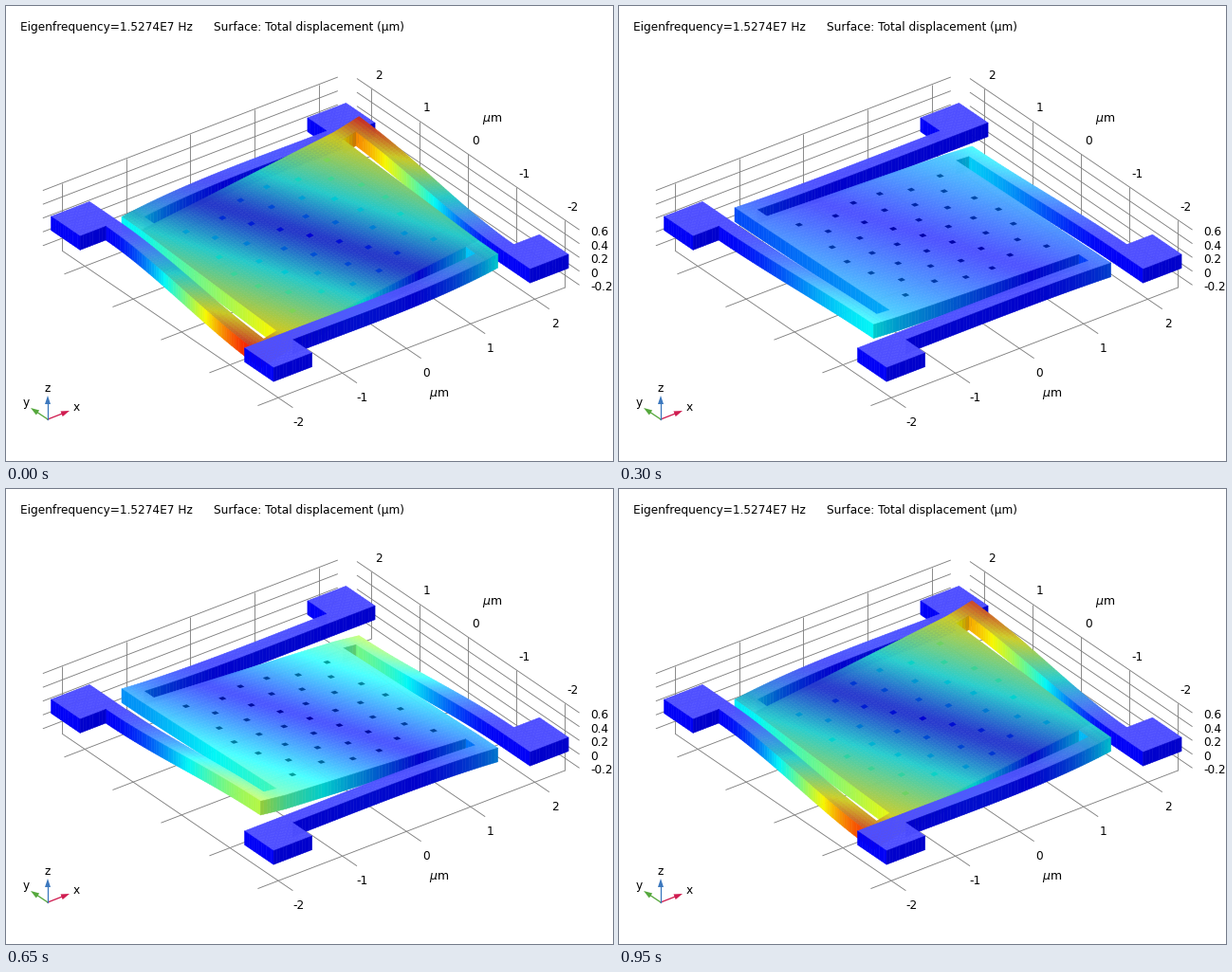
Write a matplotlib script that moves like this. It is 640 px wide and 480 px high and loops after 1 s.

```python
import numpy as np
import matplotlib.pyplot as plt
from matplotlib.animation import FuncAnimation
from matplotlib.collections import LineCollection, PolyCollection

FRAMES, INTERVAL = 20, 50
PX = 0.72                      # points per pixel at 100 dpi
TILT_X, TILT_Y = 0.115, 0.045  # slope of the plate at full swing
TILT = np.hypot(TILT_X, TILT_Y)
LINK_FLEX = 0.375              # extra swing along the plate-to-beam links
THICK, TOP_Z = 0.2, 0.305
X_MAX = 2.3                    # half size of the device
WALL = 2.47                    # position of the grid walls
Z_FLOOR, Z_CEIL = -0.38, 0.6

plt.rcParams["font.family"] = "DejaVu Sans"
plt.rcParams["mathtext.fontset"] = "dejavusans"
fig = plt.figure(figsize=(6.4, 4.8), dpi=100, facecolor="white")
ax = fig.add_axes([0, 0, 1, 1])
ax.set(xlim=(0, 640), ylim=(480, 0))
ax.axis("off")


def project(x, y, z):
    """Parallel projection to pixels; z is measured from the resting top."""
    return np.stack([320.3 + 67.6 * x - 51 * y,
                     242 - 26 * x - 34.7 * y - 72.8 * z], axis=-1)


def quarter_turns(x, y):
    """Yield the point and the plate slope in the frame of each arm."""
    p, q = TILT_X, TILT_Y
    for _ in range(4):
        yield x, y, p, q
        x, y, p, q = -y, x, -q, p


def solid(x, y):
    far_x, far_y = np.abs(x), np.abs(y)
    inside = ((far_x < 1.5) & (far_y < 1.5)) | ((far_x > 1.7) & (far_y > 1.7))
    for u, v, _, _ in quarter_turns(x, y):
        beam = (u > -1.9) & (u < -1.7) & (v > -1.5) & (v < 1.75)
        link = (u > -1.9) & (u < -1.45) & (v > -1.5) & (v < -1.3)
        inside |= beam | link
    return inside


def mode_shape(x, y):
    """Rigid plate, flexible links, clamped anchors, cubic beams in between."""
    w = TILT_X * x + TILT_Y * y
    for u, v, p, q in quarter_turns(x, y):
        flex = 1 + LINK_FLEX * np.maximum(-1.5 - u, 0)
        t = np.clip((1.7 - v) / 3, 0, 1)
        end, slope = (p * u - 1.3 * q) * flex, -3 * q
        bend = end * (3 * t**2 - 2 * t**3) + slope * (t**3 - t**2)
        link = (u < -1.51) & (v > -1.51) & (v < -1.29)
        beam = (u < -1.69) & (v > -1.29) & (v < 1.71)
        w = np.where(link, (p * u + q * v) * flex, np.where(beam, bend, w))
    anchor = (np.abs(x) > 1.69) & (np.abs(y) > 1.69)
    return np.where(anchor, 0, w)


def rainbow(v):
    knots = [0, 0.31, 0.69, 1]
    return np.stack([np.interp(v, knots, c) for c in
                     ([0, 0, 1, 1], [0, 1, 1, 0], [1, 1, 0, 0])], axis=-1)


def build_faces(n=92):
    """Visible faces of the grid cells, sorted from back to front."""
    axis = np.linspace(-X_MAX, X_MAX, n + 1)
    mid = (axis[1:] + axis[:-1]) / 2
    filled = solid(*np.meshgrid(mid, mid, indexing="ij"))
    padded = np.pad(filled, 1)
    sides = [
        (filled, [0, 1, 1, 0], [0, 0, 1, 1], [0, 0, 0, 0]),
        (filled & ~padded[:-2, 1:-1], [0] * 4, [0, 1, 1, 0], [0, 0, 1, 1]),
        (filled & ~padded[1:-1, :-2], [0, 1, 1, 0], [0] * 4, [0, 0, 1, 1]),
    ]
    ix, iy, drop, kind, depth = [], [], [], [], []
    for k, (mask, dx, dy, dz) in enumerate(sides):
        i, j = np.nonzero(mask)
        ix.append(i[:, None] + dx)
        iy.append(j[:, None] + dy)
        drop.append(np.tile(dz, (len(i), 1)) * THICK)
        kind.append(np.full(len(i), k))
        depth.append(i + j)
    order = np.argsort(-np.concatenate(depth), kind="stable")
    ix, iy, drop, kind = (np.concatenate(a)[order] for a in (ix, iy, drop, kind))
    return axis[ix], axis[iy], drop, kind


fx, fy, drop, kind = build_faces()
shape = mode_shape(fx, fy)
top = kind == 0

# Slope of each top face along the plate's own tilt: 1 on the plate, 0 on anchors.
cell = fx[top][:, 1] - fx[top][:, 0]
grad_x = (shape[top][:, 1] - shape[top][:, 0]) / cell
grad_y = (shape[top][:, 3] - shape[top][:, 0]) / cell
lean = np.clip((grad_x * TILT_X + grad_y * TILT_Y) / TILT**2, -1, 1)

# Total displacement; a leaning top also slides sideways a little.
size = np.abs(shape.mean(axis=1))
size[top] = np.hypot(size[top], THICK / 2 * TILT * lean)
peak = np.abs(shape).max()

# Etch holes: a centre, three rings and one in each corner.
centres = [(0, 0)] + [(sx * 1.1, sy * 1.1) for sx in (-1, 1) for sy in (-1, 1)]
for radius, count in ((0.4, 6), (0.79, 12), (1.18, 18)):
    for angle in 2 * np.pi * np.arange(count) / count:
        centres.append((radius * np.cos(angle), radius * np.sin(angle)))
centres = np.array(centres)
rim = (np.arange(4) + 0.5) * np.pi / 2
hole_x = centres[:, :1] + 0.05 * np.cos(rim)
hole_y = centres[:, 1:] + 0.05 * np.sin(rim)
hole_w = TILT_X * hole_x + TILT_Y * hole_y


def draw_grid():
    def line(a, b):
        return [project(x, y, z - TOP_Z) for x, y, z in (a, b)]

    segments = []
    for t in range(-2, 3):
        segments += [
            line((t, WALL, Z_FLOOR), (t, WALL, Z_CEIL)),
            line((WALL, t, Z_FLOOR), (WALL, t, Z_CEIL)),
            line((t, WALL, Z_FLOOR), (t, -X_MAX, Z_FLOOR)),
            line((-2.32, t, Z_FLOOR), (WALL, t, Z_FLOOR)),
        ]
    for z in np.arange(-1, 4) * 0.2:
        segments += [line((-X_MAX, WALL, z), (X_MAX, WALL, z)),
                     line((WALL, X_MAX, z), (WALL, -X_MAX, z))]
    ax.add_collection(LineCollection(segments, colors="#808080",
                                     linewidths=0.9 * PX, zorder=1))


def label(x, y, text, ha="center", size=12.15):
    ax.text(x, y, text, ha=ha, va="baseline", fontsize=size * PX, zorder=6)


def draw_labels():
    label(15, 26, "Eigenfrequency=1.5274E7 Hz", "left")
    label(219, 26, "Surface: Total displacement (µm)", "left")
    for t in range(-2, 3):
        label(443.5 + 67.5 * t, 391 - 26 * t, str(t))
        label(495.3 - 51.3 * t, 146.2 - 34.8 * t, str(t))
    for k, text in enumerate(["0.6", "0.4", "0.2", "0", "-0.2"]):
        label(616, 242 + 14.6 * k, text, "left")
    label(513, 122, r"$\mu$m", size=12.5)
    label(457, 412, r"$\mu$m", size=12.5)


def draw_triad():
    origin = np.array([44, 436])
    for tip, color, name, at in (((67, 427), "#d01c50", "x", (74, 427)),
                                 ((26, 424), "#55a83c", "y", (21, 422)),
                                 ((44, 411), "#3c78be", "z", (44, 407))):
        tip = np.array(tip)
        way = (tip - origin) / np.hypot(*(tip - origin))
        across = np.array([-way[1], way[0]]) * 3
        base = tip - way * 9
        ax.plot(*zip(origin, base), color=color, lw=1.3 * PX, zorder=5)
        ax.fill(*zip(tip, base + across, base - across), color=color, lw=0, zorder=5)
        label(*at, name)


draw_grid()
draw_labels()
draw_triad()
body = PolyCollection([], linewidths=0.5 * PX, zorder=3)
holes = PolyCollection([], linewidths=0, zorder=4)
ax.add_collection(body)
ax.add_collection(holes)


def update(frame):
    swing = np.cos(2 * np.pi * frame / FRAMES)
    rgb = rainbow(np.abs(swing) * size / peak)

    tilt = swing * lean
    gloss = 0.31 - np.where(tilt > 0, 0.17, 0.06) * tilt**2
    rgb[top] = rgb[top] * (0.69 - 0.04 * tilt)[:, None] + gloss[:, None]
    rgb[kind == 1] *= 0.97
    rgb[kind == 2] *= 0.8
    body.set_verts(project(fx, fy, swing * shape - drop))
    body.set_facecolor(np.clip(rgb, 0, 1))
    body.set_edgecolor("face")

    holes.set_verts(project(hole_x, hole_y, swing * hole_w))
    wall = rainbow(np.abs(swing * hole_w.mean(axis=1)) / peak)
    holes.set_facecolor(wall * (0.7 + 0.13 * swing))
    return body, holes


animation = FuncAnimation(fig, update, frames=FRAMES, interval=INTERVAL,
                          repeat=True, repeat_delay=0)
plt.show()
```
